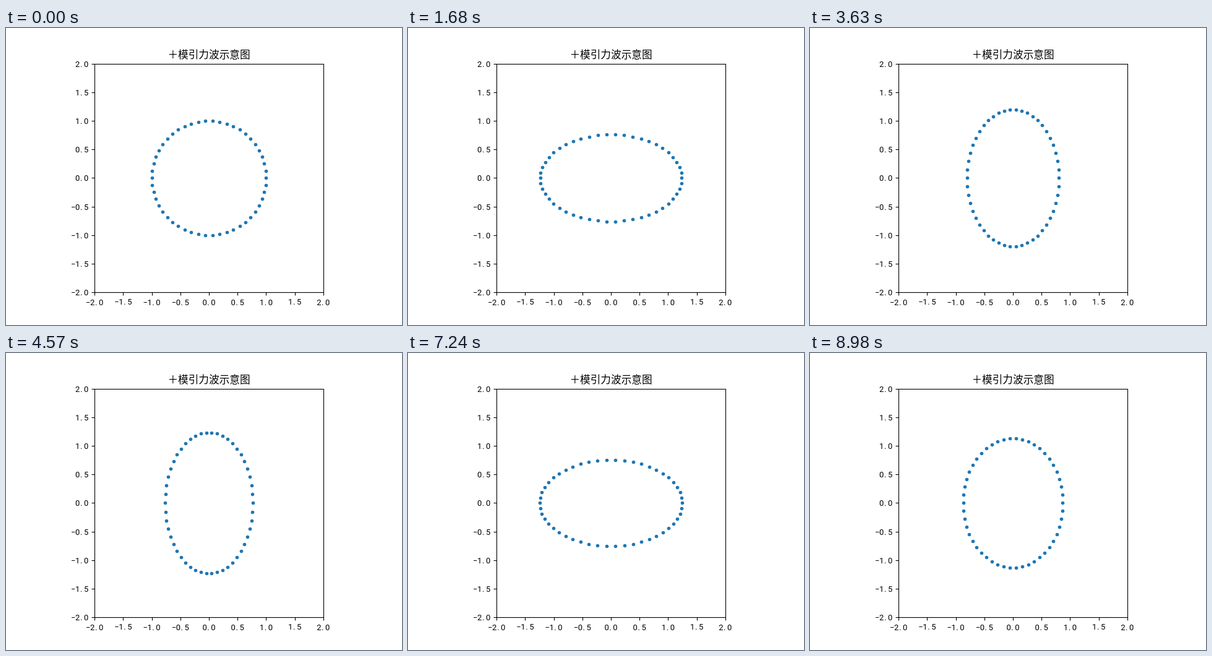
Animation, 640 px wide and 480 px high, one loop 9.01 s. Source, as an HTML page with a canvas:

```html
<!DOCTYPE html>
<html lang="zh">
<head>
<meta charset="utf-8">
<style>
  html, body { margin: 0; width: 100%; height: 100%; overflow: hidden; background: #fff; }
  canvas { display: block; }
</style>
</head>
<body>
<canvas id="plot" width="640" height="480"></canvas>
<script>
const ctx = document.getElementById('plot').getContext('2d');
const LOOP = 9010, STEP = 30, COUNT = 50;
const CX = 328, CY = 242.4, UNIT = 92.4, CELL = 6.94;

// Centre of the pixel nearest to v
const snap = v => Math.floor(v + 0.5) + 0.5;
const px = x => snap(CX + x * UNIT);
const py = y => snap(CY - y * UNIT);

function line(x1, y1, x2, y2) {
  ctx.beginPath();
  ctx.moveTo(x1, y1);
  ctx.lineTo(x2, y2);
  ctx.stroke();
}

// Tick label on half-width character cells
function label(text, left, base) {
  [...text].forEach((ch, i) => {
    const shift = ch === '.' ? -1 : 0;
    ctx.fillText(ch, left + (i + 0.5) * CELL + shift, base);
  });
}

function drawAxes() {
  ctx.strokeStyle = ctx.fillStyle = '#000';
  ctx.lineWidth = 1.11;
  const left = px(-2), right = px(2), top = py(2), bottom = py(-2);
  ctx.strokeRect(left, top, right - left, bottom - top);

  ctx.textAlign = 'center';
  ctx.font = '13px Roboto, "Liberation Sans", sans-serif';
  for (let v = -2; v <= 2; v += 0.5) {
    const text = v.toFixed(1).replace('-', '−');
    const width = text.length * CELL;
    line(px(v), bottom, px(v), bottom + 5);
    line(left, py(v), left - 5, py(v));
    label(text, CX + v * UNIT - width / 2, Math.abs(v) === 1.5 ? 447 : 448);
    label(text, 133 - width, Math.round(CY - v * UNIT + 5));
  }

  ctx.font = '16.67px "Noto Sans CJK SC", "Noto Sans CJK", sans-serif';
  ctx.fillText('＋模引力波示意图', CX, 49.3);
}

function drawRing(phase) {
  const strain = 0.25 * Math.sin(phase);
  ctx.fillStyle = '#1f77b4';
  for (let i = 0; i < COUNT; i++) {
    const a = 2 * Math.PI * i / COUNT;
    ctx.beginPath();
    ctx.arc(px((1 + strain) * Math.cos(a)), py((1 - strain) * Math.sin(a)), 2.78, 0, 2 * Math.PI);
    ctx.fill();
  }
}

function draw(now) {
  const t = now % LOOP;
  // One step in the middle of the loop lasts 10 ms longer
  const step = Math.floor((t < 4500 ? t : t - 10) / STEP);
  ctx.fillStyle = '#fff';
  ctx.fillRect(0, 0, 640, 480);
  drawAxes();
  drawRing(step / 30);
  requestAnimationFrame(draw);
}
requestAnimationFrame(draw);
</script>
</body>
</html>
```
